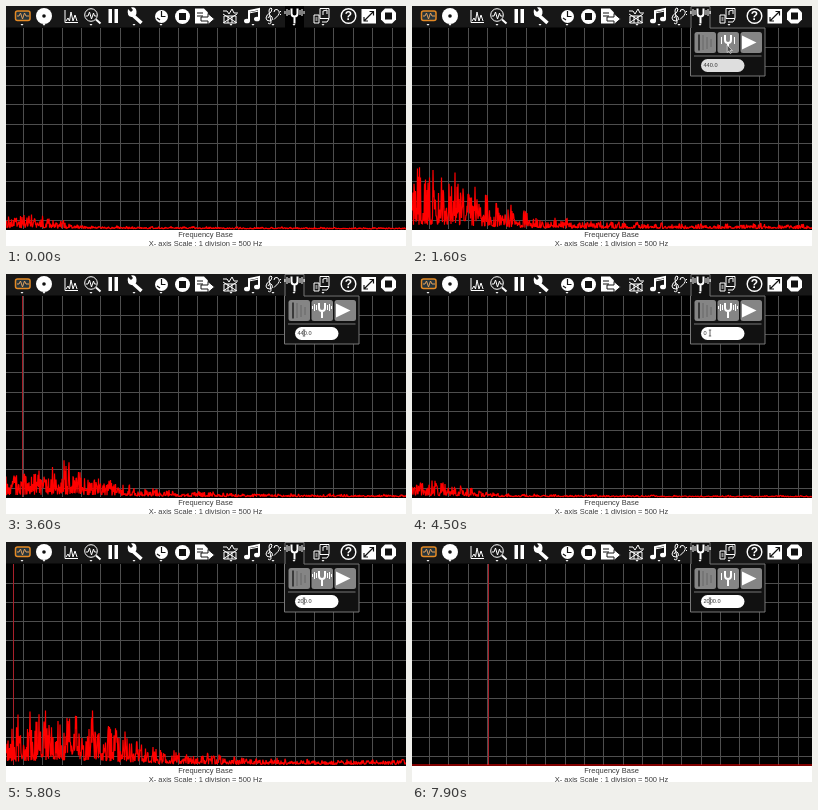
Write an HTML page with a canvas that moves like this. It is 400x240 px and loops after 8 s.

```html
<!DOCTYPE html>
<html lang="en">
<head>
<meta charset="utf-8">
<title>Frequency Base</title>
<style>
  html, body { margin: 0; width: 100%; height: 100%; overflow: hidden; background: #000; }
  canvas, svg { position: absolute; left: 0; top: 0; width: 400px; height: 240px; }
  text { font-family: Arial, "Liberation Sans", sans-serif; }
  .w { fill: #fff; }
  .k { fill: #111; }
  .s { fill: none; stroke: #fff; }
  .d { fill: none; stroke: #111; stroke-width: 1.2; }
  .bold { stroke-width: 2; }
</style>
</head>
<body>
<canvas id="plot" width="400" height="240"></canvas>
<svg viewBox="0 0 400 240">
  <defs>
    <path id="fork" class="s bold" d="M-3-7V-2Q-3 1 0 1Q3 1 3-2V-7M0 1V8"/>
    <path id="waves" class="s" d="M-5.5-5V0M-7.5-6V1M-9.5-4V-1M5.5-5V0M7.5-6V1M9.5-4V-1"/>
    <path id="more" class="w" d="M-1.5 0H1.500L0 1.800Z"/>
    <rect id="button" y="26" width="21.500" height="21" rx="2.500" fill="#858585"/>
  </defs>

  <!-- toolbar -->
  <rect width="400" height="21.500" fill="#171717"/>
  <rect x="279" width="19" height="22" fill="#000"/>

  <rect x="9.500" y="5" width="14.500" height="9.500" rx="2" fill="#25343c" stroke="#e58a25" stroke-width="1.500"/>
  <path d="M11 10h2l1.500-3 2 6 2-6 1.500 3h3" fill="none" stroke="#e0a060"/>
  <circle class="w" cx="38" cy="10" r="8"/>
  <circle class="k" cx="38" cy="10" r="1.800"/>
  <path class="s" d="M59 4V16.500H72M60 15l2-3 1.500 3 1.500-9 2 9 2-6 2 6"/>
  <circle class="s" cx="85" cy="9" r="6.300"/>
  <path class="s" d="M80 10h2l1.500-4 2 7 2-6 1 3h2"/>
  <path class="s bold" d="M90 13.500l4.500 4"/>
  <path class="w" d="M102.500 3h3.500v14h-3.500zM108.500 3h3.500v14h-3.500z"/>
  <path class="s" d="M126 8.500L135.500 17" style="stroke-width:3.600"/>
  <path class="w" d="M122 3l3 3 2-2-2-2.500q5-1 5.500 4t-5 5.500q-5-1-3.500-8z"/>
  <circle class="w" cx="155.500" cy="10.500" r="6.500"/>
  <path class="d" d="M155.500 5v5.500h4M151 12l3 2"/>
  <circle class="w" cx="176.500" cy="10.500" r="7.500"/>
  <rect class="k" x="173" y="7" width="7" height="7"/>
  <path class="w" d="M189 2.500h9l4 4v11h-13z"/>
  <path class="d" d="M191 7h6M191 10h6"/>
  <path d="M195 11h7V7.500l6.500 5.500-6.500 5.500V15h-7z" fill="#fff" stroke="#171717"/>
  <path class="s" d="M217 5h4l2 3 3-5 2 4h4M218 10h12v7h-12zM222 10v7M226 10v7M217 8l14 9M231 8l-14 9"/>
  <path class="s bold" d="M243 15V5l10-2v10"/>
  <path class="s" d="M243 7l10-2"/>
  <ellipse class="w" cx="241" cy="15" rx="3" ry="2.300"/>
  <ellipse class="w" cx="251" cy="13" rx="3" ry="2.300"/>
  <path class="s" d="M262 17q3 2 3-1L263 5q0-3 2-3t0 4q-5 3-5 6t4 3q4-1 2-4t-4 1"/>
  <path class="s" d="M268 6q0-3 3-2.500 4 2 1 6l-4 4M274.500 5v1M274.500 8v1"/>
  <use href="#fork" x="288.500" y="9.500"/>
  <use href="#waves" x="288.500" y="9"/>
  <path class="s" d="M314 2.500h9v10h-9zM317 9V5l4-1v4M308 9h5v8h-5zM309.500 12h2M309.500 14h2M316 16h5l2-3"/>
  <circle class="s" cx="342.500" cy="10" r="7.300" style="stroke-width:1.400"/>
  <text class="w" x="342.500" y="14.300" font-size="12" font-weight="bold" text-anchor="middle">?</text>
  <rect class="w" x="355.500" y="3" width="14.500" height="14.500"/>
  <path class="d" d="M358 15l9.500-9.500M363.500 5.500h4v4M358 11v4h4"/>
  <path class="w" d="M379 2.500h7l4 4v7l-4 4h-7l-4-4v-7z"/>
  <rect class="k" x="379" y="6.500" width="7" height="7"/>
  <g id="marks"></g>

  <!-- caption -->
  <rect y="224" width="400" height="16" fill="#fff"/>
  <g font-size="7.500" fill="#3c3c3c" text-anchor="middle">
    <text x="199.500" y="231.200">Frequency Base</text>
    <text x="199.500" y="239.500">X- axis Scale : 1 division = 500 Hz</text>
  </g>

  <text id="note" x="352" y="33" font-size="7" font-weight="bold" fill="#d9a036">6 #</text>

  <!-- tone generator -->
  <g id="popup">
    <path d="M278.500 22H279V.500H298V22H353V70H278.500Z" fill="#111" stroke="#777"/>
    <use href="#fork" x="288.500" y="9.500"/>
    <use href="#waves" x="288.500" y="9"/>
    <use href="#more" x="288" y="18"/>
    <use href="#button" x="282.500"/>
    <use href="#button" x="305.500"/>
    <use href="#button" x="328.500"/>
    <path d="M287 28.500v16" stroke="#222" stroke-width="1.500"/>
    <path d="M291 29v15M295 31v12M299 33v8" stroke="#666"/>
    <use href="#fork" x="316" y="36"/>
    <use id="ringing" href="#waves" x="316" y="36"/>
    <path id="still" class="s" d="M309.500 31v7M322.500 31v7"/>
    <path class="w" d="M330 29.500L344.500 36.500 330 43.500Z"/>
    <path d="M282 50H349.500" stroke="#777"/>
    <rect id="field" x="289" y="53" width="43.500" height="13" rx="6.500"/>
    <text id="value" x="291.500" y="61.300" font-size="5.600" fill="#333"></text>
  </g>
  <path id="arrow" d="M0 0V7.500L1.700 6 3 8.500 4.200 8 3 5.500H5.300Z" fill="#555" stroke="#eee" stroke-width=".6"/>
  <path id="beam" d="M-1.200-3H1.200M0-3V3M-1.200 3H1.200" stroke="#444" stroke-width=".8"/>
</svg>
<script>
const LOOP = 8000, STEP = 100, TOP = 22, BASE = 223;
const $ = id => document.getElementById(id);
const ctx = $('plot').getContext('2d');

// Noise hump over time: height, centre, width
const hump = [[0, [17, 25, 35]], [1600, [55, 12, 80]], [2800, [45, 85, 100]],
  [4500, [17, 15, 45]], [5800, [64, 60, 75]], [6600, [84, 78, 75]], [7800, [0, 78, 75]]];
const typed = [[0, '440.0'], [3700, '0'], [5000, '20.0'], [5500, '200.0'], [6400, '2000.0']];
const pointer = [[700, [288, 10]], [1500, [316, 38]], [2800, [305, 51]], [3400, [298, 59]]];

const mix = (a, b, k) => a + (b - a) * k;
const show = (id, on) => $(id).style.display = on ? '' : 'none';

function tween(keys, t) {
  const next = keys.findIndex(k => k[0] > t);
  if (next < 1) return keys.at(next)[1];
  const [t0, a] = keys[next - 1], [t1, b] = keys[next];
  return a.map((v, i) => mix(v, b[i], (t - t0) / (t1 - t0)));
}

function random(a, b) {
  const v = Math.sin(a * 12.9898 + b * 78.233) * 43758.5453;
  return v - Math.floor(v);
}

// Spiky noise under a hump with a long, low tail
function noise(x, [height, centre, width], seed) {
  const top = height * (Math.exp(-(((x - centre) / width) ** 2)) + .28 * Math.exp(-x / 400));
  const cell = Math.floor(x / 3);
  const slow = mix(random(cell, seed), random(cell + 1, seed), x / 3 - cell);
  return top * (.06 + .94 * (.35 + .65 * slow) * random(x, seed + 99) ** 1.7);
}

function line(color, width, points) {
  ctx.strokeStyle = color;
  ctx.lineWidth = width;
  ctx.beginPath();
  points.forEach(p => ctx.lineTo(...p));
  ctx.stroke();
}

function drawPlot(t, tone) {
  ctx.fillStyle = '#000';
  ctx.fillRect(0, 0, 400, 240);
  for (let k = 0; k < 20; k++) {
    const x = Math.floor(18.2 + k * 19.42) - .5;
    line('#4e4e4e', 1, [[x, TOP], [x, BASE]]);
  }
  for (let k = 0; k < 10; k++) {
    const y = Math.floor(41.2 + k * 19.25) + .5;
    line('#4e4e4e', 1, [[0, y], [400, y]]);
  }
  const toneX = Math.floor(tone * .0386 - .7) + .5;
  if (tone) line('#a8202a', 1, [[toneX, TOP], [toneX, BASE]]);

  const shape = tween(hump, t), points = [];
  for (let x = 0; x <= 400; x += .5) points.push([x, BASE - noise(x, shape, t / STEP + 1)]);
  ctx.lineJoin = 'bevel';
  line('#f00', 1.2, points);
}

function frame(now) {
  const t = Math.floor(now % LOOP / STEP) * STEP;
  const text = typed.findLast(e => e[0] <= t)[1];
  const ringing = t >= 1900 && t < 7700, editing = t >= 3400;
  drawPlot(t, t >= 2000 ? Number(text) : 0);
  show('popup', t >= 600);
  show('ringing', ringing);
  show('still', !ringing);
  show('note', t >= 6400 && t < 7200);
  show('arrow', t >= 700 && !editing);
  show('beam', editing);
  $('value').textContent = text;
  $('field').setAttribute('fill', editing ? '#fff' : '#dedede');
  for (const id of ['arrow', 'beam']) $(id).setAttribute('transform', `translate(${tween(pointer, t)})`);
  requestAnimationFrame(frame);
}

$('marks').innerHTML = [16, 38, 85, 128, 155, 225, 247, 267, 288, 317]
  .map(x => `<use href="#more" x="${x}" y="18"/>`).join('');
requestAnimationFrame(frame);
</script>
</body>
</html>
```
